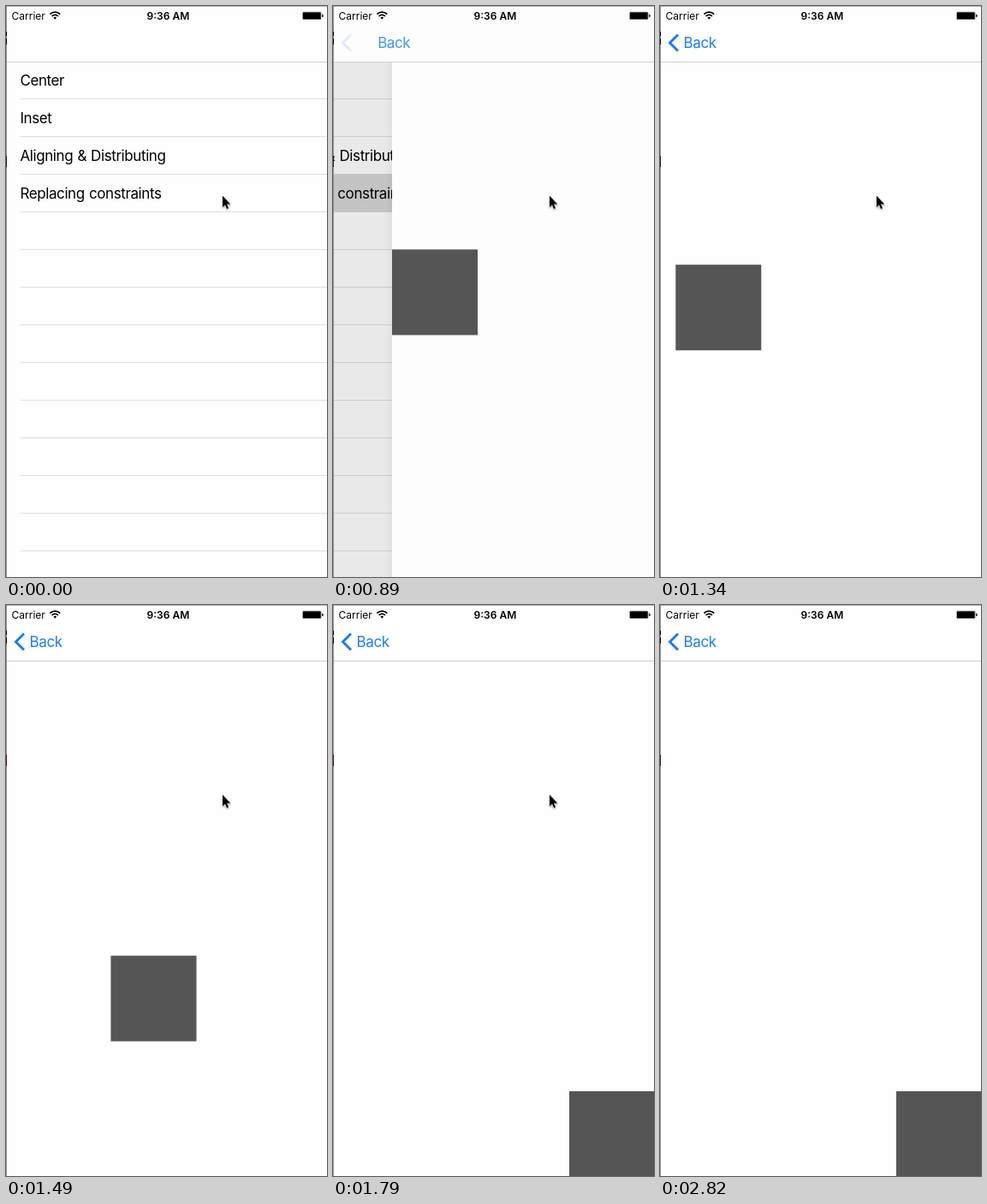
Animation, 375 px wide and 667 px high, one loop 2960 ms. Source, as an HTML page:

```html
<!DOCTYPE html>
<html lang="en">
<head>
<meta charset="utf-8">
<title>Replacing constraints</title>
<style>
html, body { margin: 0; width: 100%; height: 100%; overflow: hidden; background: #fefefe; }
svg { display: block; width: 375px; height: 667px; }
text { font-family: Inter, "Liberation Sans", sans-serif; font-size: 17px; letter-spacing: -.4px; word-spacing: .8px; }
.status text { font-size: 12px; letter-spacing: 0; word-spacing: 0; }
.status .time { font-weight: 600; }
#cursor { filter: drop-shadow(0 1px .8px rgba(0, 0, 0, .4)); }
</style>
</head>
<body>
<svg viewBox="0 0 375 667">
  <defs>
    <linearGradient id="fade">
      <stop offset="0" stop-opacity="0"/>
      <stop offset="1" stop-opacity=".2"/>
    </linearGradient>
  </defs>
  <rect width="375" height="667" fill="#fefefe"/>

  <g id="list">
    <g id="lines" fill="#dedede"></g>
    <rect id="picked" y="196" width="375" height="45" fill="#d5d5d5"/>
    <g id="labels"></g>
  </g>
  <rect id="dim" y="66" width="375" height="601"/>

  <g id="panel">
    <rect id="shadow" x="-9" y="66" width="9" height="601" fill="url(#fade)"/>
    <rect id="page" y="66" width="375" height="601"/>
    <rect id="box" width="100" height="100" fill="#555"/>
  </g>

  <rect id="bar" width="375" height="65"/>
  <rect y="65" width="375" height="1" fill="#cfcfcf"/>
  <g fill="#1d7bfb">
    <path id="chevron" d="M21 33.5 11.5 43 21 52.5" fill="none" stroke="#1d7bfb" stroke-width="3"/>
    <text id="back" y="49">Back</text>
  </g>

  <g class="status">
    <text x="6.6" y="15.8">Carrier</text>
    <text class="time" x="164.6" y="15.8">9:36 AM</text>
    <g fill="none" stroke="#000" stroke-width="1.7">
      <path d="M51.4 9.7a8.2 8.2 0 0 1 11.8 0"/>
      <path d="M53.6 12a5.2 5.2 0 0 1 7.4 0"/>
    </g>
    <path d="M55.4 13.6a2.7 2.7 0 0 1 3.8 0L57.3 15.8z"/>
    <rect x="346.2" y="6.7" width="22.2" height="9.4" rx="1.5" opacity=".45"/>
    <rect x="347" y="7.5" width="20.6" height="7.8" rx=".6"/>
    <path d="M369.2 9.6q1.5.4 1.5 1.8t-1.5 1.8z"/>
  </g>

  <rect width="375" height="1" fill="#b4b4b4"/>
  <rect width="1" height="667" fill="#8f8f8f"/>
  <path d="M0 30h1v5h-1zM0 38h1v7h-1z"/>
  <rect y="175" width="1" height="13" fill="#3c0a22"/>

  <path id="cursor" d="M2 .8V14L5 11.3 7 16 9 15.2 7 10.6H11.3Z"
        stroke="#fff" stroke-width="1" paint-order="stroke"/>
</svg>
<script>
const $ = id => document.getElementById(id);
const LOOP = 2960, TAP = 741, STEP = 148.5;
const WIDTH = 374, ROW = 44;

const titles = ["Center", "Inset", "Aligning &amp; Distributing", "Replacing constraints"];
for (let y = 108; y < 667; y += ROW)
  $("lines").innerHTML += `<rect x="17" y="${y}" width="358" height="1"/>`;
$("labels").innerHTML = titles
  .map((title, i) => `<text x="16.4" y="${93 + i * ROW}">${title}</text>`).join("");

const clamp = v => Math.min(1, Math.max(0, v));
const progress = (k, start, steps) => clamp((k - start) / steps);
const easeInOut = v => (1 - Math.cos(Math.PI * v)) / 2;
const easeOut = v => 1 - (1 - v) ** 2;
const mix = (a, b, v) => a + (b - a) * v;

const move = (id, x, y = 0) => $(id).setAttribute("transform", `translate(${x} ${y})`);
const set = (id, name, value) => $(id).setAttribute(name, value);

function draw(t) {
  // The picture is held between ticks of a slow clock; k counts ticks since the tap.
  const k = Math.floor((t - TAP) / STEP);
  const pushed = k >= 0;

  // Push: the distance left falls off as a bell curve, in whole pixels.
  const left = pushed ? Math.ceil(WIDTH * Math.exp(-((.491 + .818 * k) ** 2)) - .01) : WIDTH;
  const rest = left / WIDTH, p = 1 - rest;
  const haze = pushed ? rest : 0;
  move("panel", 1 + left);
  move("list", -112 * p);
  set("dim", "opacity", .1 * p);
  set("shadow", "opacity", haze);
  set("picked", "opacity", pushed ? 1 : 0);

  const tone = Math.round(254 - 5 * haze);
  set("page", "fill", `rgb(${tone} ${tone} ${tone})`);
  set("bar", "fill", `rgb(${tone} ${tone} ${tone})`);

  set("back", "x", 27.6 + 135 * rest);
  set("back", "opacity", p);
  set("chevron", "opacity", p ** 10);

  const b = easeInOut(progress(k, 3.465, 3.317));
  move("box", 275 * b, mix(284.4, 568, b));

  // The pointer glides down, rests, then slips out at the bottom.
  const down = easeOut(progress(k, 7.87, 1));
  const out = easeOut(progress(k, 10.15, 2.3));
  move("cursor", mix(mix(251, 317, down), 355, out), mix(mix(221, 567, down), 664, out));
  set("cursor", "opacity", k < 14 ? 1 : 0);
}

const origin = performance.now();
function tick() {
  draw((performance.now() - origin) % LOOP);
  requestAnimationFrame(tick);
}
tick();
</script>
</body>
</html>
```
